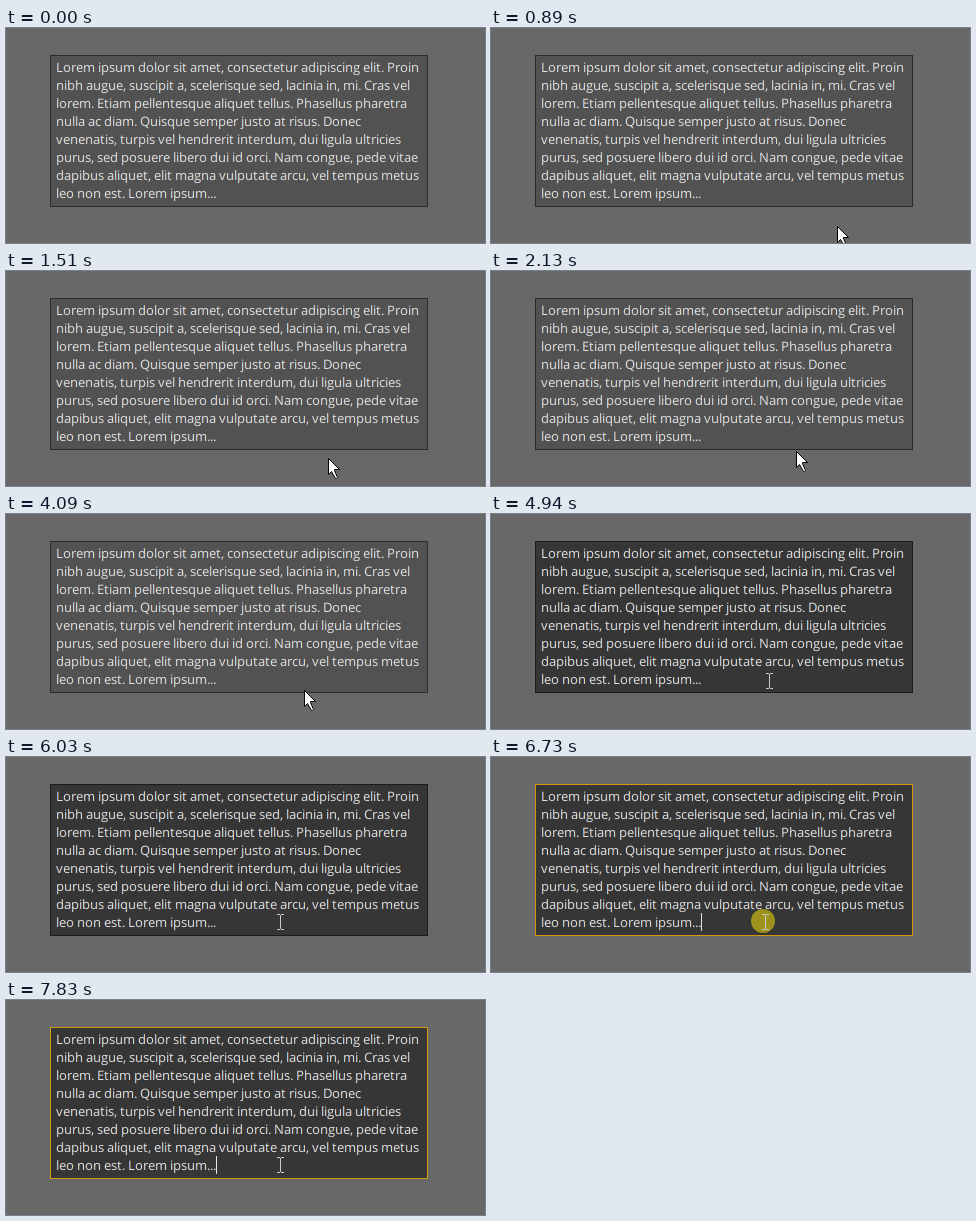
An HTML page that plays this animation: 479x215 px, repeating every 8 s.

```html
<!DOCTYPE html>
<html lang="en">
<head>
<meta charset="utf-8">
<title>Text area states</title>
<style>
  html, body { margin: 0; width: 100%; height: 100%; overflow: hidden; background: #686868; }
  svg { display: block; }
  text { font: 13px "Open Sans", sans-serif; white-space: pre; text-rendering: geometricPrecision; }
  .channel { mix-blend-mode: lighten; }
</style>
</head>
<body>
<svg width="479" height="215" viewBox="0 0 479 215">
  <rect width="479" height="215" fill="#686868"/>
  <rect id="box" x="44.5" y="27.5" width="377" height="151"/>
  <!-- Subpixel text: red and blue sit a third of a pixel beside green. -->
  <g class="channel" fill="#00e400"><g id="copy"></g></g>
  <use class="channel" href="#copy" x=".33" fill="#e40000"/>
  <use class="channel" href="#copy" x="-.33" fill="#0000e4"/>
  <rect id="caret" x="210" y="156" width="1" height="18" fill="#e6e6e6"/>
  <circle id="press" cx="272" cy="164" r="12" fill="#9c921c"/>
  <path id="arrow" d="M.5 .5V16.5L3.5 13.5L7.5 20.5H8.5L9.5 19.5L6.5 12.5V11.5H11.5Z" fill="#fff" stroke="#000"/>
  <path id="beam" d="M0 0H3V1H4V0H7V1H4V15H7V16H4V15H3V16H0V15H3V1H0Z" fill="#cbcbcb"/>
</svg>
<script>
const LOOP = 8000, TICK = 76;
const HOVER = 4160, FOCUS = 6730, RELEASE = 6880, BLINK = 550;
const $ = id => document.getElementById(id);
const lines = [
  'Lorem ipsum dolor sit amet, consectetur adipiscing elit. Proin',
  'nibh augue, suscipit a, scelerisque sed, lacinia in, mi. Cras vel',
  'lorem. Etiam pellentesque aliquet tellus. Phasellus pharetra',
  'nulla ac diam. Quisque semper justo at risus. Donec',
  'venenatis, turpis vel hendrerit interdum, dui ligula ultricies',
  'purus, sed posuere libero dui id orci. Nam congue, pede vitae',
  'dapibus aliquet, elit magna vulputate arcu, vel tempus metus',
  'leo non est. Lorem ipsum...'
];

// Lay glyphs out on whole pixels, as hinted text does.
const ctx = document.createElement('canvas').getContext('2d');
ctx.font = '13px "Open Sans", sans-serif';
const advance = ch => Math.round(ctx.measureText(ch).width + 0.01);

lines.forEach((line, row) => {
  const el = document.createElementNS('http://www.w3.org/2000/svg', 'text');
  let x = 50;
  el.setAttribute('x', [...line].map(ch => {
    const at = x;
    x += advance(ch);
    return at;
  }).join(' '));
  el.setAttribute('y', 44 + row * 18);
  el.textContent = line;
  $('copy').append(el);
});

// A pointer eases out to each key point in turn, one step per tick.
const arrow = {
  x: 355, y: 217, power: 2.1,
  stops: [
    { at: 500, span: 150, x: 355, y: 202 },
    { at: 820, span: 380, x: 329, y: 189 },
    { at: 1510, span: 380, x: 309, y: 180 },
    { at: 2060, span: 70, x: 305, y: 180 },
    { at: 4010, span: 80, x: 298, y: 176 }
  ]
};
const beam = {
  x: 295, y: 167, power: 1.4,
  stops: [
    { at: 4330, span: 760, x: 273, y: 158 },
    { at: 5400, span: 0, x: 271, y: 157 }
  ]
};

function place({ x, y, power, stops }, t) {
  for (const stop of stops) {
    if (t < stop.at) break;
    const count = Math.round(stop.span / TICK) + 1;
    const gap = stop.span / (count - 1 || 1) || 1;
    const step = Math.min(count, 1 + Math.floor((t - stop.at) / gap));
    const k = 1 - (1 - step / count) ** power;
    x += (stop.x - x) * k;
    y += (stop.y - y) * k;
  }
  return `translate(${Math.floor(x)} ${Math.ceil(y)})`;
}

const show = (id, on) => $(id).setAttribute('visibility', on ? 'visible' : 'hidden');

function draw(t) {
  const hover = t >= HOVER, focus = t >= FOCUS;
  $('box').setAttribute('fill', hover ? '#363636' : '#525252');
  $('box').setAttribute('stroke', focus ? '#d09a0c' : hover ? '#1c1c1c' : '#2b2b2b');
  show('arrow', t >= 500 && !hover);
  show('beam', hover);
  show('press', focus && t < RELEASE);
  show('caret', focus && Math.floor((t - FOCUS) / BLINK) % 2 === 0);
  $('arrow').setAttribute('transform', place(arrow, t));
  $('beam').setAttribute('transform', place(beam, t));
}

function tick() {
  draw(performance.now() % LOOP);
  requestAnimationFrame(tick);
}
tick();
</script>
</body>
</html>
```
